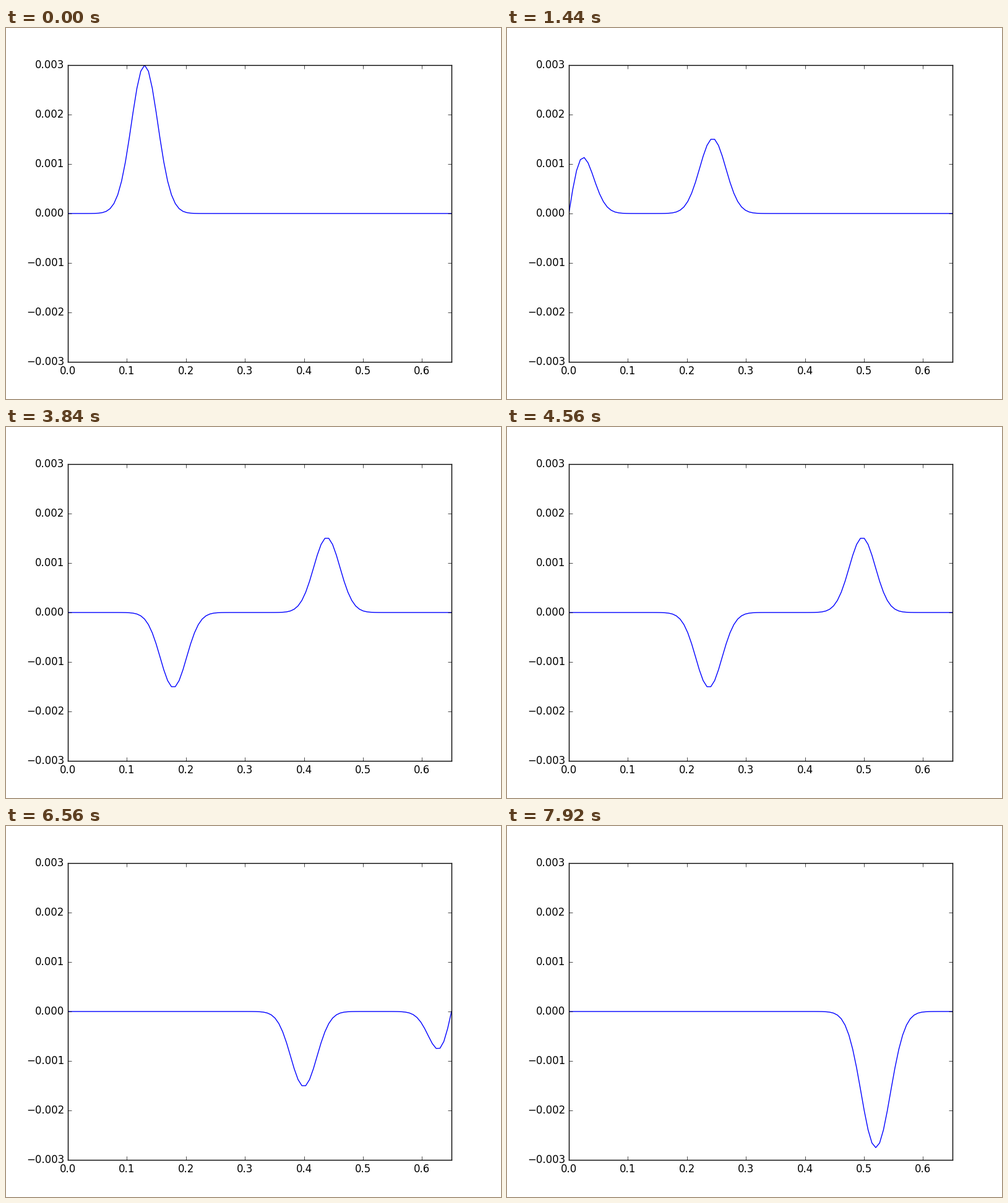
These frames come from a looping animation (800 px wide and 600 px high, 8 s). A matplotlib script:

```python
import numpy as np
import matplotlib.pyplot as plt
from matplotlib.animation import FuncAnimation

LENGTH = 0.65
CELLS = 100
FRAMES = 100
STEP_MS = 80


def pluck(x):
    return 0.003 * np.exp(-1000 * (x - 0.13) ** 2)


def simulate(u0, count):
    """Wave on a string with fixed ends, Courant number 1, starting at rest."""
    states = [u0, u0]
    while len(states) < count:
        prev, now = states[-2:]
        new = np.zeros_like(now)
        new[1:-1] = now[2:] + now[:-2] - prev[1:-1]
        states.append(new)
    return states


plt.style.use("classic")
fig, ax = plt.subplots(figsize=(8, 6), dpi=100, facecolor="white")
ax.set_xlim(0, LENGTH)
ax.set_ylim(-0.003, 0.003)

x = np.linspace(0, LENGTH, CELLS + 1)
waves = simulate(pluck(x), FRAMES)
line, = ax.plot(x, waves[0], color="blue", lw=1)


def update(i):
    line.set_ydata(waves[i])
    return line,


anim = FuncAnimation(fig, update, frames=FRAMES, interval=STEP_MS,
                     repeat=True, repeat_delay=0, blit=False)
plt.show()
```
